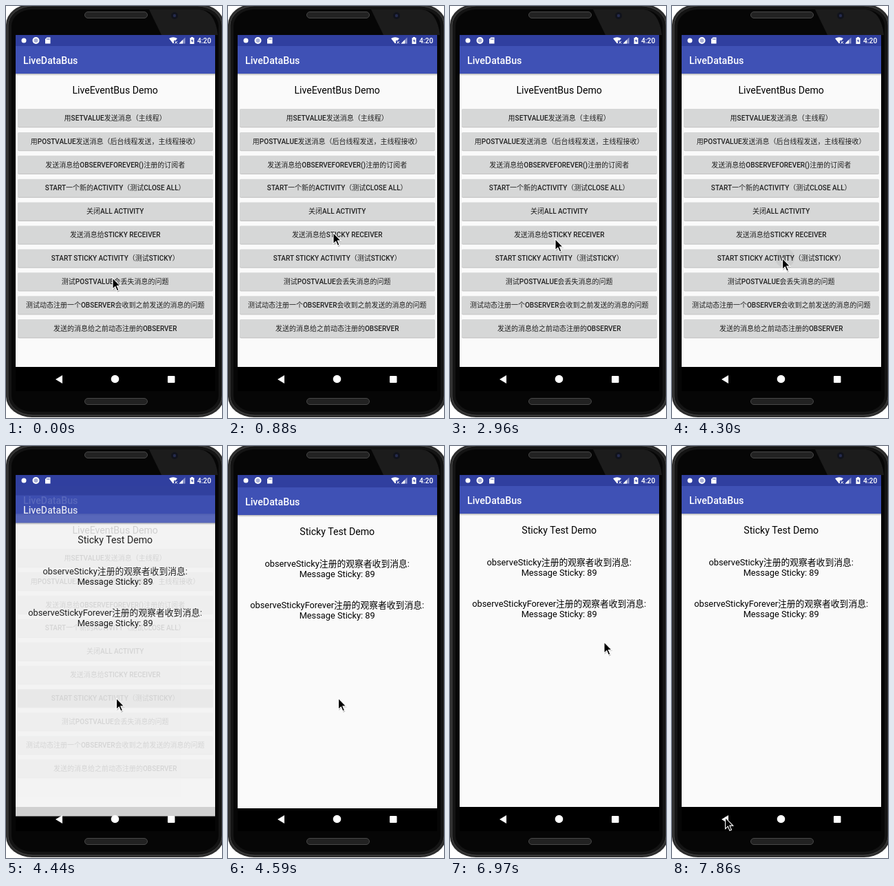
Recreate the animation shown at these times as an HTML page. Size 314x597 px, loop 8000 ms.

```html
<!DOCTYPE html>
<html lang="zh-CN">
<head>
<meta charset="utf-8">
<title>LiveDataBus</title>
<style>
html, body { margin: 0; width: 100%; height: 100%; overflow: hidden; background: #fff; }
svg { display: block; width: 314px; height: 597px; }
text { font-family: Roboto, "Noto Sans CJK SC", "Noto Sans CJK", sans-serif; }
.mid { text-anchor: middle; }
.head { font-size: 14.15px; fill: #000; }
.msg { font-size: 12.8px; fill: #000; }
.btn { font-size: 10px; font-weight: 500; fill: #212121; }
.bar { font-size: 14.2px; font-weight: 500; fill: #fff; }
</style>
</head>
<body>
<svg id="stage" viewBox="0 0 314 597"></svg>
<script>
const labels = [
  '用SETVALUE发送消息（主线程）',
  '用POSTVALUE发送消息（后台线程发送，主线程接收）',
  '发送消息给OBSERVEFOREVER()注册的订阅者',
  'START一个新的ACTIVITY（测试CLOSE ALL）',
  '关闭ALL ACTIVITY',
  '发送消息给STICKY RECEIVER',
  'START STICKY ACTIVITY（测试STICKY）',
  '测试POSTVALUE会丢失消息的问题',
  '测试动态注册一个OBSERVER会收到之前发送的消息的问题',
  '发送的消息给之前动态注册的OBSERVER'
];
const rowY = i => 149 + i * 33.9;

const rect = (x, y, w, h, fill, more = '') =>
  `<rect x="${x}" y="${y}" width="${w}" height="${h}" fill="${fill}" ${more}/>`;
const text = (cls, y, str, x = 158.7) => `<text class="${cls}" x="${x}" y="${y}">${str}</text>`;

const button = (label, i) => {
  const y = rowY(i);
  return rect(17, y + 1.3, 284, 26, '#000', 'rx="2" opacity=".2"') +
    rect(17, y, 284, 26, '#d6d7d7', 'rx="1.5"') + text('btn mid', y + 16.7, label);
};

const page = content =>
  rect(14, 42, 290, 16, '#303f9f') + rect(14, 98, 290, 425, '#fafafa') +
  rect(14, 58, 290, 40, '#3f51b5') + rect(14, 98, 290, 3, 'url(#shade)') +
  text('bar', 84, 'LiveDataBus', 25) + content;

const speaker = y => rect(114.5, y, 91, 9, '#222', 'rx="4.5" stroke="#484848"');

const phone =
  rect(0, -3, 317, 599, '#2c2c2c', 'rx="38" ry="30"') +
  rect(3, 0, 311, 593, '#141414', 'rx="36" ry="28" stroke="#444"') +
  rect(8, 5, 301, 583, '#060606', 'rx="30" ry="24"') +
  '<path d="M208 5H282Q304 8 308 42H226Z" fill="#1c1c1c"/>' +
  rect(14, 523, 290, 35, '#000') + speaker(8.5) + speaker(568.5) +
  '<circle cx="245" cy="14" r="5" fill="#11131c"/><circle cx="245" cy="14" r="2.2" fill="#252b4d"/>';

const nav = `<g fill="#fff"><path d="M72 541L82 535V547Z"/><circle cx="158.5" cy="540.5" r="5.8"/>
  <rect x="235" y="536" width="10.5" height="10" rx="1"/></g>`;

const status = `<g fill="#fff">
  <circle cx="26" cy="50" r="3.5"/>
  <circle cx="43.5" cy="50" r="5"/><circle cx="43.5" cy="50" r="3" fill="#a9b0d6"/>
  <path d="M59.5 45.5H64.5V54.5H57V48Z"/>
  <path d="M59.7 47V49M61.3 47V49M62.9 47V49" stroke="#303f9f" stroke-width=".7"/>
  <path d="M237 47Q243 43.5 249 47L246.5 50H244V53.5L243 54.5Z"/>
  <path d="M245.5 51L249 54.5M249 51L245.5 54.5" stroke="#fff"/>
  <path d="M251.5 54.5L260.5 45.5V54.5Z" opacity=".45"/><path d="M251.5 54.5L257 49V54.5Z"/>
  <path d="M267.5 46H269V45H272V46H273.5V55H267.5Z"/>
  <path d="M271 47.5L269 51H270.5V53.5L272.2 50H271Z" fill="#303f9f"/>
  <text x="278" y="54" font-size="10.3" font-weight="500">4:20</text></g>`;

const home = page(text('head mid', 127, 'LiveEventBus Demo') + labels.map(button).join(''));
const sticky = page(text('head mid', 127, 'Sticky Test Demo') +
  ['observeSticky', 'observeStickyForever'].map((name, i) =>
    text('msg mid', 172.5 + i * 60, name + '注册的观察者收到消息:') +
    text('msg mid', 187.5 + i * 60, 'Message Sticky: 89')).join(''));

const $ = id => document.getElementById(id);
$('stage').innerHTML = `<defs>
  <linearGradient id="shade" x2="0" y2="1"><stop stop-color="#000" stop-opacity=".28"/>
    <stop offset="1" stop-color="#000" stop-opacity="0"/></linearGradient>
  <clipPath id="below"><rect x="14" y="58" width="290" height="500"/></clipPath>
  <clipPath id="row"><rect id="rowBox" x="17" width="284" height="26"/></clipPath></defs>
  ${phone}${nav}${home}
  <g clip-path="url(#row)"><circle id="ripple"/></g>
  ${rect(14, 58, 290, 465, '#000', 'id="dim"')}
  <g clip-path="url(#below)"><g id="next">${sticky}</g></g>
  ${status}
  <g id="cursor"><path d="M0 0V16.5L3.8 13L6.5 19.3L9.3 18.1L6.6 11.9H11.7Z" transform="translate(.6 1.2)" opacity=".25"/>
    <path d="M0 0V16.2L3.8 12.7L6.4 18.8L9 17.7L6.4 11.6H11.3Z" stroke="#fff" stroke-width="1.1"/></g>`;

// Each move: start, end, then evenly timed pointer positions
const moves = [
  [0, 0, [155, 394]],
  [150, 880, [154, 385], [149, 368], [144, 351], [146, 339], [151, 332], [153, 328.5]],
  [2960, 3700, [153, 337.5], [154, 344], [155, 351], [157, 358], [159, 363], [160.5, 365.5]],
  [5930, 6670, [124.5, 254.5], [84, 251], [108, 246], [157, 252], [203, 259], [226, 262]],
  [6970, 7860, [224, 284], [200, 324], [170, 370], [144, 419], [123, 469], [92, 521], [77.5, 538.5]]
];

function pointer(t) {
  const [start, end, ...spots] = moves.filter(m => m[0] <= t).pop();
  const last = spots.length - 1;
  const step = last ? Math.floor((t - start) / (end - start) * last + 0.03) : 0;
  return spots[Math.min(last, step)];
}

function setRipple(row, x, y, r, alpha) {
  $('rowBox').setAttribute('y', rowY(row));
  for (const [k, v] of Object.entries({ cx: x, cy: y, r, opacity: alpha })) $('ripple').setAttribute(k, v);
}

function draw(t) {
  $('cursor').setAttribute('transform', `translate(${pointer(t)})`);

  if (t >= 2070 && t < 2370) setRipple(5, 155, 332, 31, 0.05);
  else if (t >= 4300 && t < 4440) setRipple(6, 164, 365, 14, 0.05);
  else if (t >= 4440 && t < 4590) setRipple(6, 164, 365, 300, 0.2);
  else setRipple(0, 0, 0, 0, 0);

  const opening = t >= 4440 && t < 4590;
  const shift = opening ? 13.5 : t < 4730 ? 2 : 0;
  $('dim').setAttribute('opacity', opening ? 0.15 : 0);
  $('next').setAttribute('opacity', t < 4440 ? 0 : opening ? 0.83 : 1);
  $('next').setAttribute('transform', `translate(0 ${shift})`);
}

const begin = performance.now();
function frame() {
  draw((performance.now() - begin) % 8000);
  requestAnimationFrame(frame);
}
frame();
</script>
</body>
</html>
```
